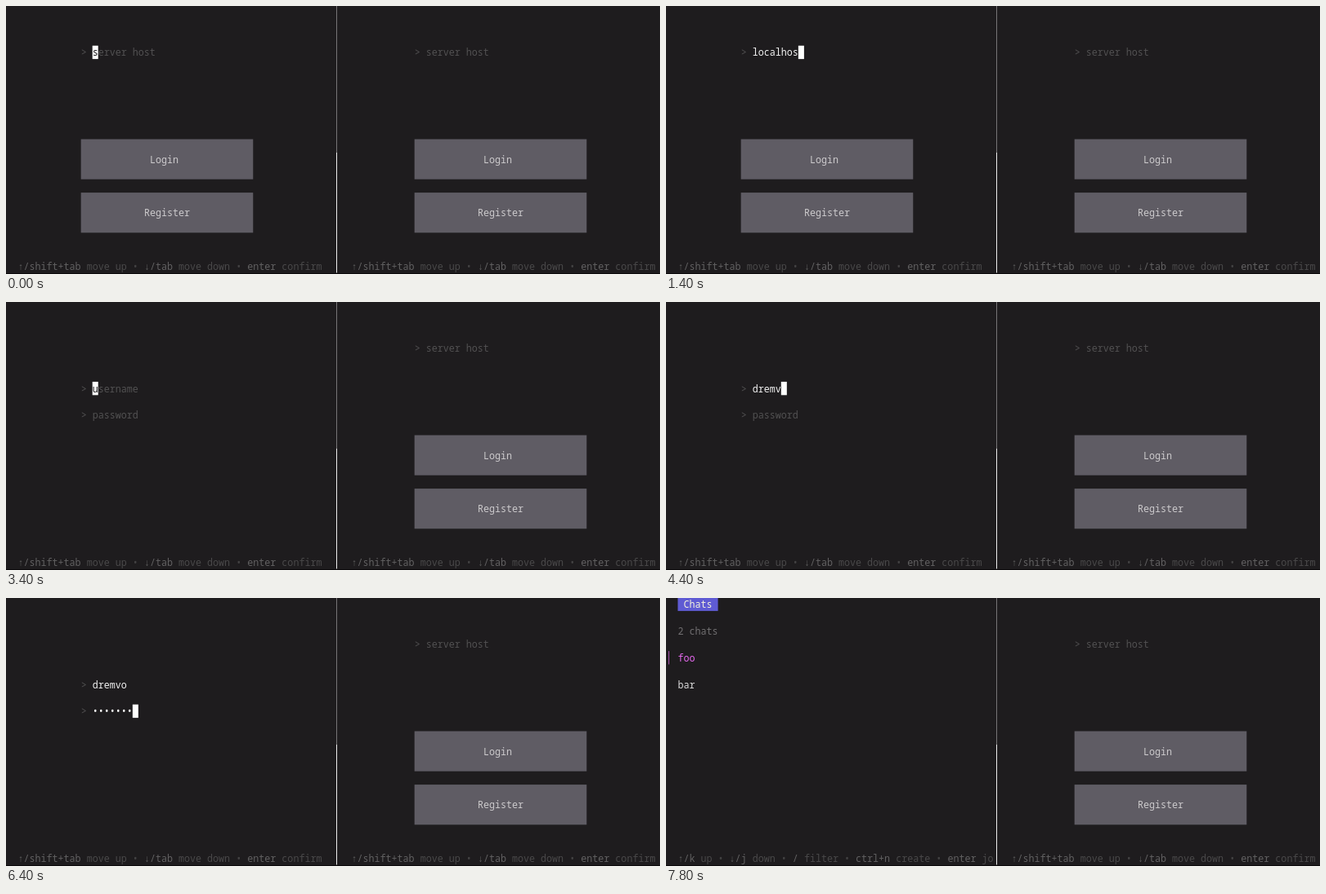
An HTML page for the animation above (8000 ms loop, 800 by 329 pixels).

```html
<!DOCTYPE html>
<html lang="en">
<head>
<meta charset="utf-8">
<title>Terminal chat login</title>
<style>
html, body { margin: 0; width: 100%; height: 100%; overflow: hidden; background: #1e1c1e; }
svg { display: block; width: 100%; height: 100%; }
text { font: 11.7px "Noto Sans Mono", "DejaVu Sans Mono", monospace; white-space: pre; }
</style>
</head>
<body>
<svg id="stage" viewBox="0 0 800 329"></svg>
<script>
const LOOP = 8000, STEP = 200;
const CELL_W = 7.02, CELL_H = 16.4, RIGHT = 408;
const C = {
  bg: '#1e1c1e', button: '#5f5c64', label: '#cdcbcd', dim: '#525152', typed: '#f2f2f2',
  cursor: '#ffffff', key: '#626162', desc: '#4a494a', sep: '#424142',
  title: '#5f5bd3', titleText: '#f4f2dc', status: '#716f71',
  pink: '#e569ee', pinkBar: '#a855ae', item: '#dddcdd'
};

const FORM_HELP = [['↑/shift+tab', 'move up'], ['↓/tab', 'move down'], ['enter', 'confirm']];
const LIST_HELP = [['↑/k', 'up'], ['↓/j', 'down'], ['/', 'filter'], ['ctrl+n', 'create'], ['enter', 'jo']];

const HOST = 'localhost:8443', USER = 'dremvo';
const every = (start, count) => Array.from({ length: count }, (_, i) => start + i * STEP);
const hostKeys = [...every(200, 7), 1400, 1600, ...every(2000, 5)];
const userKeys = every(3600, 6);
const passKeys = every(5200, 8);
const hostBlur = 3200, loginOpen = 3400, passFocus = 5000, chatsOpen = 7000;
const rightBlink = [[800, 1200], [1800, 2200], [2800, 3200], [3800, 4400],
                    [5000, 5600], [6000, 6400], [7000, 7600]];

const colX = c => 0.4 + c * CELL_W;
const rowY = r => r * CELL_H - 0.5;
const count = (keys, t) => keys.filter(k => k <= t).length;

function rect(x, y, w, h, fill) {
  return `<rect x="${x}" y="${y}" width="${w}" height="${h}" fill="${fill}"/>`;
}

function block(col, row, cols, rows, fill) {
  return rect(colX(col), rowY(row), cols * CELL_W, rows * CELL_H, fill);
}

function text(col, row, str, fill) {
  return `<text x="${colX(col)}" y="${rowY(row) + 12.6}" fill="${fill}">${str}</text>`;
}

function input(row, hint, value, focused) {
  const col = 15 + value.length;
  let out = text(13, row, '&gt;', C.dim) + text(15, row, value || hint, value ? C.typed : C.dim);
  if (focused) {
    out += block(col, row, 1, 1, C.cursor);
    if (!value) out += text(col, row, hint[0], C.bg);
  }
  return out;
}

function button(row, label) {
  return block(13, row, 30, 3, C.button) +
    text(13 + (30 - label.length) / 2 - (label.length % 2) / 2, row + 1, label, C.label);
}

function help(items) {
  let col = 2, out = '';
  items.forEach(([key, desc], i) => {
    if (i) {
      out += text(col + 1, 19, '•', C.sep);
      col += 3;
    }
    out += text(col, 19, key, C.key);
    col += key.length + 1;
    out += text(col, 19, desc, C.desc);
    col += desc.length;
  });
  return out;
}

function hostForm(value, focused) {
  return input(3, 'server host', value, focused) +
    button(10, 'Login') + button(14, 'Register') + help(FORM_HELP);
}

function loginForm(t) {
  const inPass = t >= passFocus;
  return input(6, 'username', USER.slice(0, count(userKeys, t)), !inPass) +
    input(8, 'password', '•'.repeat(count(passKeys, t)), inPass) + help(FORM_HELP);
}

function chatList() {
  return block(2, 0, 7, 1, C.title) + text(3, 0, 'Chats', C.titleText) +
    text(2, 2, '2 chats', C.status) +
    rect(3, rowY(4), 1, CELL_H, C.pinkBar) + text(2, 4, 'foo', C.pink) +
    text(2, 6, 'bar', C.item) + help(LIST_HELP);
}

function leftPane(t) {
  if (t >= chatsOpen) return chatList();
  if (t >= loginOpen) return loginForm(t);
  return hostForm(HOST.slice(0, count(hostKeys, t)), t < hostBlur);
}

function draw(t) {
  const blink = rightBlink.some(([on, off]) => t >= on && t < off);
  return rect(0, 0, 800, 329, C.bg) + leftPane(t) +
    `<g transform="translate(${RIGHT})">${hostForm('', blink)}</g>` +
    rect(404, 0, 1, 180, '#777577') + rect(404, 180, 1, 147.5, '#eeeeee') +
    rect(0, 328, 800, 1, '#0b090b');
}

const stage = document.getElementById('stage');
const start = performance.now();
let shown = -1;

function tick() {
  const elapsed = Math.max(0, performance.now() - start) % LOOP;
  const t = Math.floor(elapsed / STEP) * STEP;
  if (t !== shown) {
    stage.innerHTML = draw(t);
    shown = t;
  }
  requestAnimationFrame(tick);
}
tick();
</script>
</body>
</html>
```
